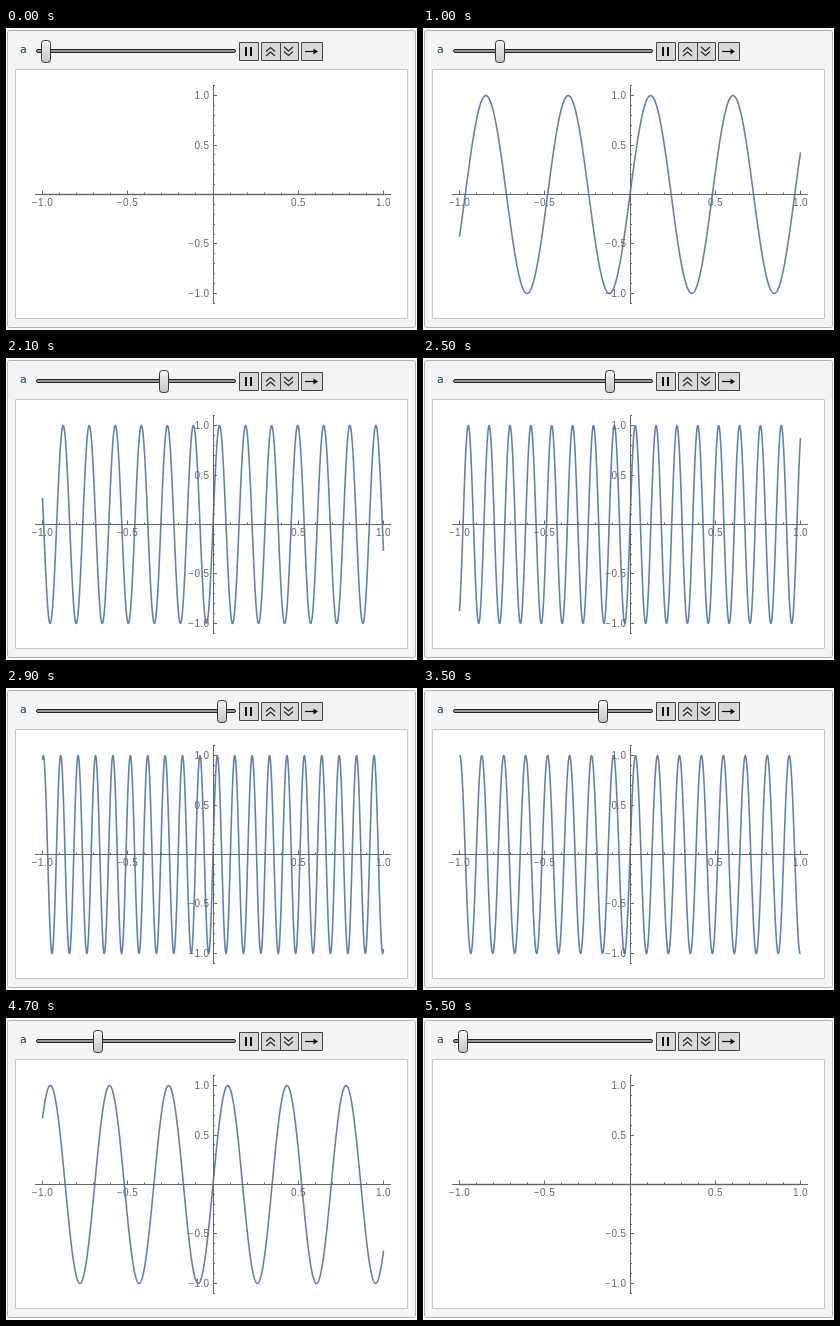
Recreate the animation shown at these times as an HTML page with a canvas. Size 411 by 302 pixels, loop 6 s.

```html
<!DOCTYPE html>
<html lang="en">
<head>
<meta charset="utf-8">
<title>Sine frequency slider</title>
<style>
html, body { margin: 0; width: 100%; height: 100%; overflow: hidden; background: #fff; }
canvas { display: block; }
</style>
</head>
<body>
<canvas id="stage" width="411" height="302"></canvas>
<script>
const ctx = document.getElementById('stage').getContext('2d');
const LOOP = 6000, START = 500, STEP = 100, STEPS = 50;
const MAX_A = 20 * Math.PI, HALF_SWEEP = 24.59, LEAD = 0.09;
const X0 = 207, Y0 = 166.5, UNIT_X = 170.5, UNIT_Y = 98.9;
const INK = '#222', AXIS = '#666';

function box(x, y, w, h, radius, fill, stroke) {
  ctx.beginPath();
  ctx.roundRect(x, y, w, h, radius);
  ctx.fillStyle = fill;
  ctx.fill();
  ctx.strokeStyle = stroke;
  ctx.lineWidth = 1;
  ctx.stroke();
}

function line(points, color, width = 1) {
  ctx.beginPath();
  points.forEach(([x, y]) => ctx.lineTo(x, y));
  ctx.strokeStyle = color;
  ctx.lineWidth = width;
  ctx.stroke();
}

function label(text, x, y, align) {
  ctx.font = '10px "Liberation Sans", Arial, sans-serif';
  ctx.letterSpacing = '0.4px';
  ctx.textAlign = align;
  ctx.fillStyle = AXIS;
  ctx.fillText(text, x, y);
  ctx.letterSpacing = '0px';
}

function parameterAt(time) {
  const step = Math.floor((time % LOOP - START) / STEP);
  if (step < 0 || step >= STEPS) return 0;
  const pos = step + LEAD;
  return MAX_A * Math.min(pos, 2 * HALF_SWEEP - pos) / HALF_SWEEP;
}

function drawPanel() {
  ctx.fillStyle = '#fff';
  ctx.fillRect(0, 0, 411, 302);
  box(1.5, 2.5, 408, 297, 2, '#f4f4f4', '#b0b0b0');
  box(9.5, 41.5, 392, 249, 0, '#fff', '#c6c6c6');
}

function drawControls(a) {
  ctx.font = '11px "DejaVu Sans", Verdana, sans-serif';
  ctx.textAlign = 'left';
  ctx.fillStyle = '#0b3a52';
  ctx.fillText('a', 14, 25);

  box(30.5, 21.5, 199, 3, 1.5, '#999', INK);
  const knobX = Math.round(40 + 180 * a / MAX_A);
  const shade = ctx.createLinearGradient(0, 12, 0, 34);
  shade.addColorStop(0, '#f8f8f8');
  shade.addColorStop(0.5, '#dedede');
  shade.addColorStop(1, '#c4c4c4');
  box(knobX - 4.5, 12.5, 9, 22, 3, shade, '#333');

  for (const [x, w] of [[233.5, 19], [255.5, 19], [274.5, 18], [295.5, 21]]) {
    box(x, 14.5, w, 18, 0, '#d9d9d9', '#444');
  }
  ctx.fillStyle = '#111';
  ctx.fillRect(239, 19, 2, 9);
  ctx.fillRect(244, 19, 2, 9);
  for (const y of [19.5, 24]) {
    line([[260, y + 4], [264.5, y], [269, y + 4]], INK, 1.1);
    line([[278, y - 0.5], [282.5, y + 3.5], [287, y - 0.5]], INK, 1.1);
  }
  line([[299, 23.5], [310, 23.5]], '#111', 1.2);
  ctx.fillStyle = '#111';
  ctx.beginPath();
  ctx.moveTo(312, 23.5);
  ctx.lineTo(307.5, 20.5);
  ctx.lineTo(307.5, 26.5);
  ctx.fill();
}

function drawCurve(a) {
  const points = [];
  for (let i = -1000; i <= 1000; i++) {
    const x = i / 1000;
    points.push([X0 + UNIT_X * x, Y0 - UNIT_Y * Math.sin(a * x)]);
  }
  ctx.lineJoin = 'round';
  line(points, '#5e81b5', 1.6);
  ctx.lineJoin = 'miter';
}

function drawAxes() {
  line([[29, Y0], [385, Y0]], AXIS);
  line([[X0 + 0.5, 57], [X0 + 0.5, 276]], AXIS);
  for (let i = -11; i <= 11; i++) {
    if (!i) continue;
    const major = i % 5 === 0;
    const x = Math.floor(X0 + UNIT_X * i / 10) + 0.5;
    const y = Math.floor(Y0 - UNIT_Y * i / 10) + 0.5;
    const size = major ? 4 : 2;
    if (Math.abs(i) <= 10) line([[x, Y0], [x, Y0 - size]], AXIS);
    line([[X0, y], [X0 + size, y]], AXIS);
    if (major) {
      const text = (i / 10).toFixed(1).replace('-', '\u2212');
      label(text, x, 178, 'center');
      label(text, 203.5, y + 3.5, 'right');
    }
  }
}

function render(time) {
  const a = parameterAt(time);
  drawPanel();
  drawControls(a);
  drawCurve(a);
  drawAxes();
}

const origin = performance.now();
function tick() {
  render(performance.now() - origin);
  requestAnimationFrame(tick);
}
tick();
</script>
</body>
</html>
```
